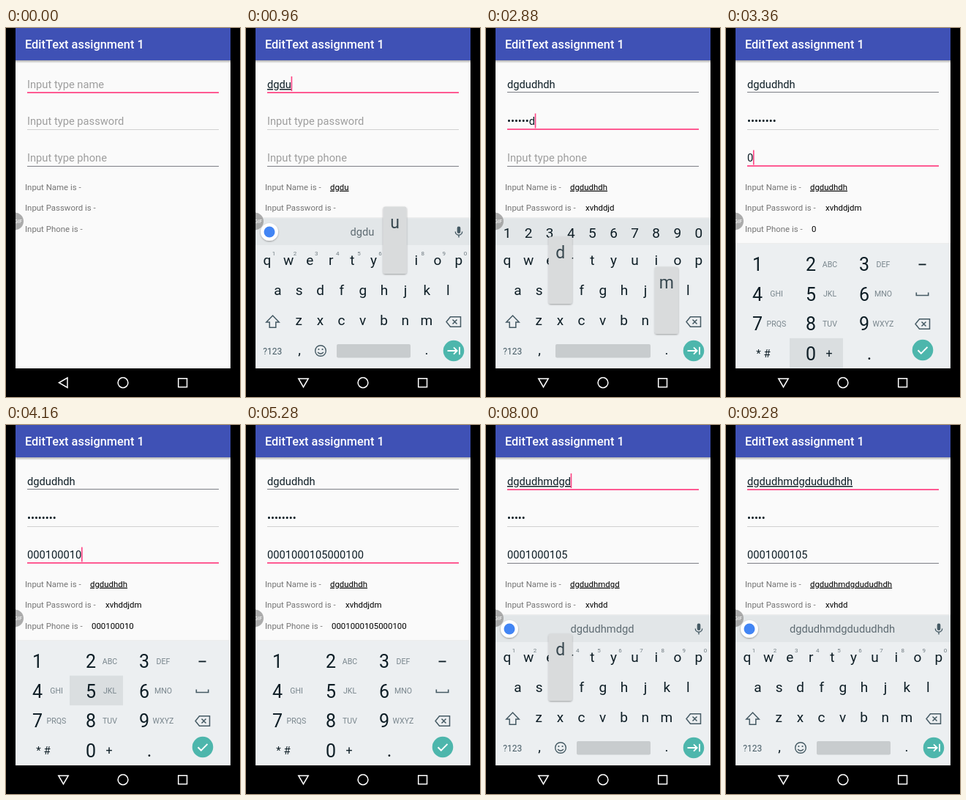
These frames come from a looping animation (320 px wide and 503 px high, 9600 ms). An HTML page:

```html
<!DOCTYPE html>
<html lang="en">
<head>
<meta charset="utf-8">
<title>EditText assignment 1</title>
<style>
  html, body { margin: 0; width: 100%; height: 100%; overflow: hidden; background: #000; }
  svg { display: block; width: 320px; height: 503px; }
  text { font-family: Roboto, sans-serif; white-space: pre; }
  .under { text-decoration: underline; text-decoration-skip-ink: none; }
</style>
</head>
<body>
<svg id="stage" viewBox="0 0 320 503"></svg>
<script>
const LOOP = 9600;
const PASSWORD = 'xvhddjdm';
const PHONE = '0001000105000100';
const INK = '#0e1e26', GREY = '#455a64', PINK = '#ff4081', TEAL = '#4db6ac';
const stage = document.getElementById('stage');

// Each step: time, focused field, its content (text or length), pressed keys, extras
const steps = [
  [0, 'name', '', '', { keyboard: 0, cursor: false }],
  [160, 'name', '', '', { keyboard: .55 }],
  [320, 'name', ''],
  [480, 'name', 'd', 'd'],
  [640, 'name', 'dg', 'g'],
  [800, 'name', 'dgd', 'd'],
  [960, 'name', 'dgdu', 'u'],
  [1120, 'name', 'dgdud', 'd'],
  [1280, 'name', 'dgdudh', 'h'],
  [1440, 'name', 'dgdudhd', 'd'],
  [1600, 'name', 'dgdudhdh', 'h'],
  [1760, 'name', 'dgdudhdh'],
  [2080, 'pass', 0],
  [2240, 'pass', 1, 'x'],
  [2400, 'pass', 2, 'v'],
  [2560, 'pass', 3, 'h'],
  [2720, 'pass', 5, 'd'],
  [2880, 'pass', 7, 'dm'],
  [3040, 'pass', 8, 'm'],
  [3200, 'phone', 0],
  [3360, 'phone', 1, '0'],
  [3520, 'phone', 3, '0'],
  [3680, 'phone', 4, '1'],
  [3840, 'phone', 6, '0'],
  [4000, 'phone', 7, '0'],
  [4160, 'phone', 9, '5'],
  [4320, 'phone', 11, '0'],
  [4480, 'phone', 13, '0'],
  [4640, 'phone', 15, '0'],
  [4800, 'phone', 16],
  [5280, 'phone', 16, '', { cursor: false }],
  [5440, 'phone', 15, '<'],
  [5760, 'phone', 14, '<'],
  [5920, 'phone', 12, '<'],
  [6080, 'phone', 10, '<'],
  [6240, 'pass', 8],
  [6400, 'pass', 7, '<'],
  [6560, 'pass', 6, '<'],
  [6720, 'pass', 5, '<'],
  [6880, 'pass', 5],
  [7200, 'name', 'dgdudhdh'],
  [7360, 'name', 'dgdudhd', '<'],
  [7520, 'name', 'dgdudh', '<'],
  [7680, 'name', 'dgdudhm', 'm'],
  [7840, 'name', 'dgdudhmdg', 'g'],
  [8000, 'name', 'dgdudhmdgd', 'd'],
  [8160, 'name', 'dgdudhmdgdud', 'd'],
  [8320, 'name', 'dgdudhmdgdudu', 'u'],
  [8480, 'name', 'dgdudhmdgdududh', 'h'],
  [8640, 'name', 'dgdudhmdgdududhdh', 'h'],
  [8800, 'name', 'dgdudhmdgdududhdh'],
  [9280, 'name', 'dgdudhmdgdududhdh', '', { cursor: false }]
];

// Carry the content of the other fields from step to step
const held = { name: '', pass: 0, phone: 0 };
const states = steps.map(([time, focus, value, press = '', extra], i) => {
  const typed = focus === 'pass' && press && press !== '<';
  held[focus] = value;
  return { time, focus, press, typed, keyboard: 1, cursor: true, ...held, ...extra };
});

const text = (s, x, y, size, fill = INK, attrs = '') =>
  `<text x="${x}" y="${y}" font-size="${size}" fill="${fill}" ${attrs}>${s}</text>`;
const mid = (s, x, y, size, fill, attrs = '') =>
  text(s, x, y, size, fill, 'text-anchor="middle" ' + attrs);
const rect = (x, y, w, h, fill, attrs = '') =>
  `<rect x="${x}" y="${y}" width="${w}" height="${h}" fill="${fill}" ${attrs}/>`;
const disc = (x, y, r, fill, attrs = '') =>
  `<circle cx="${x}" cy="${y}" r="${r}" fill="${fill}" ${attrs}/>`;
const line = (d, stroke = GREY, width = 1.6) =>
  `<path d="${d}" fill="none" stroke="${stroke}" stroke-width="${width}"/>`;

const defs = `<defs>
  <linearGradient id="drop" x2="0" y2="1">
    <stop stop-color="#000" stop-opacity=".3"/><stop offset="1" stop-color="#000" stop-opacity="0"/>
  </linearGradient>
  <filter id="lift" x="-20%" y="-20%" width="140%" height="140%">
    <feDropShadow dx="0" dy="1" stdDeviation="1" flood-opacity=".35"/>
  </filter>
  <clipPath id="screen"><rect x="13" width="294" height="464"/></clipPath>
</defs>`;

function field(id, hint, value, base, idle, s) {
  const active = s.focus === id;
  const under = active && id === 'name' ? 'class="under"' : '';
  const body = value
    ? text(value, 29, base, 14.7, INK, `id="${id}" ${under}`)
    : text(hint, 29, base, 14.7, '#9e9e9e');
  const rule = active
    ? rect(29, base + 5.2, 262, 1.7, PINK)
    : rect(29, base + (id === 'name' ? 5 : 6), 262, 1, idle);
  return body + rule;
}

function form(s) {
  const shown = PASSWORD.slice(0, s.pass);
  const dots = s.typed ? '•'.repeat(s.pass - 1) + shown.slice(-1) : '•'.repeat(s.pass);
  const digits = PHONE.slice(0, s.phone);
  const label = (name, value, x, y, attrs) =>
    text(`Input ${name} is -`, 26, y, 11.43, '#757575') + text(value, x, y, 11.43, '#000', attrs);
  return rect(13, 0, 294, 464, '#fafafa') +
    rect(13, 44, 294, 4, 'url(#drop)') +
    rect(13, 0, 294, 44, '#3f51b5') +
    text('EditText assignment 1', 26, 28, 16.33, '#fff', 'font-weight="500"') +
    field('name', 'Input type name', s.name, 82, '#7d7f86', s) +
    field('pass', 'Input type password', dots, 132, '#d0d0d0', s) +
    field('phone', 'Input type phone', digits, 182, '#7d7f86', s) +
    label('Name', s.name, 115, 220.7, 'class="under"') +
    label('Password', shown, 136, 249.4) +
    label('Phone', digits, 117, 278);
}

const erase = (x, y) => line(`M${x - 10} ${y}l5.5-6.7h14v13.4h-14z` +
  `M${x - 1.5} ${y - 3}l6 6m0-6l-6 6`, GREY, 1.5);

const rows = [['qwertyuiop', 29, 323], ['asdfghjkl', 43.5, 364], ['zxcvbnm', 72.3, 405]];
const PITCH = 29.1;

function popup(key) {
  const [letters, x0, base] = rows.find(r => r[0].includes(key));
  const x = x0 + PITCH * letters.indexOf(key);
  return rect(x - 16, base - 79.5, 32, 91.5, '#d9dbdc', 'rx="3" filter="url(#lift)"') +
    mid(key, x, base - 50, 23, '#37474f');
}

function strip(s) {
  const at = i => 29 + PITCH * i;
  const numbers = [...'1234567890'];
  if (s.focus === 'pass') return numbers.map((n, i) => mid(n, at(i), 286, 19)).join('');
  return disc(32, 278, 12, '#fff', 'filter="url(#lift)"') + disc(32, 278, 7.5, '#4285f4') +
    mid(s.name, 159, 283, 14.7, '#5f6c73') +
    rect(288.7, 270.5, 4.6, 9.5, GREY, 'rx="2.3"') +
    line('M286.3 277.5a4.7 4.7 0 0 0 9.4 0M291 282v3.5', GREY, 1.4) +
    numbers.map((n, i) => mid(n, at(i) + 9, 310, 8, '#6f7b81')).join('');
}

function letterBoard(s) {
  const secret = s.focus === 'pass';
  const keys = rows.map(([letters, x, y]) =>
    [...letters].map((c, i) => mid(c, x + PITCH * i, y, 19)).join('')).join('');
  const face = disc(102, 440, 7.3, 'none', `stroke="${GREY}" stroke-width="1.4"`) +
    disc(99.4, 438, 1.1, GREY) + disc(104.6, 438, 1.1, GREY) + line('M98 442q4 4 8 0', GREY, 1.3);
  const space = secret ? 95 : 124;
  return rect(13, 258, 294, 2, '#000', 'opacity=".05"') +
    rect(13, 259.5, 294, 205, '#eceff1') + rect(13, 259.5, 294, 36.5, '#e2e6e8') +
    (s.press === '<' ? rect(266, 381, 36, 39, '#dadee0') : '') +
    strip(s) + keys +
    line('M36.5 392l8.7 9h-4.4v7.3h-8.6v-7.3h-4.4z', GREY, 1.5) + erase(284, 400.5) +
    mid('?123', 36.3, 444.5, 12, GREY) + mid(',', 73, 445, 19) + (secret ? '' : face) +
    rect(space, 431, 225 - space, 18.5, '#c8ccce', 'rx="2"') + mid('.', 247, 445, 19) +
    disc(284, 440, 14.3, TEAL) +
    line('M275.5 440h13M284 435.3l4.7 4.7l-4.7 4.7M292 434.7v10.6', '#fff', 1.8) +
    (s.press === '<' ? '' : [...s.press].map(popup).join(''));
}

const subs = ['', 'ABC', 'DEF', 'GHI', 'JKL', 'MNO', 'PRQS', 'TUV', 'WXYZ'];
const PAD_ORDER = '123-456_789<*0.';

function numberPad(s) {
  let out = rect(13, 293, 294, 1, '#000', 'opacity=".05"') + rect(13, 294, 294, 170, '#eceff1');
  if (s.press) {
    const i = PAD_ORDER.indexOf(s.press);
    out += rect(14 + 73 * (i % 4), 301 + 40.6 * Math.floor(i / 4), 73, 40.6, '#dadee0');
  }
  subs.forEach((sub, i) => {
    const x = 43 + 73 * (i % 3), y = 331 + 40.6 * Math.floor(i / 3);
    out += mid(i + 1, x, y, 25) + mid(sub, x + 26, y - 5.5, 10.6, '#78858c');
  });
  return out + mid('* #', 51, 449, 15) + mid('0', 116, 453, 25) + mid('+', 141, 449, 16) +
    mid('.', 196, 452, 25) + rect(263.5, 321.5, 10, 1.8, INK) +
    line('M260.3 360.5v4h16.4v-4') + erase(269, 403.5) +
    disc(269, 439, 14.3, TEAL) + line('M262.5 439.3l4.3 4.3l8.7-8.7', '#fff', 2);
}

function overlay(s) {
  const back = s.keyboard ? 'M71.8 478h13.4l-6.7 11.5z' : 'M72.5 483.5l11.5-6.6v13.2z';
  return `<g clip-path="url(#screen)">${disc(12, 263.5, 12, '#9c9c9c', 'opacity=".85"')}` +
    text('GIF', 22, 266, 7, '#fff', 'text-anchor="end"') + '</g>' +
    rect(0, 464, 320, 39, '#000') + line(back, '#fff', 1.5) +
    disc(160, 483.5, 6.9, 'none', 'stroke="#fff" stroke-width="1.5"') +
    line('M235.7 477.7h11.8v11.8h-11.8z', '#fff', 1.5);
}

function caret(s) {
  const y = { name: 66, pass: 116.5, phone: 166.5 }[s.focus];
  const label = document.getElementById(s.focus);
  const x = 29 + (label ? label.getComputedTextLength() : 0);
  document.getElementById('caret').innerHTML = rect(x - .3, y, 1.6, 20, PINK);
}

function draw(s) {
  const board = s.focus === 'phone' ? numberPad(s) : letterBoard(s);
  const slide = 205 * (1 - s.keyboard);
  stage.innerHTML = defs + form(s) + '<g id="caret"></g>' +
    (s.keyboard ? `<g transform="translate(0 ${slide})">${board}</g>` : '') + overlay(s);
  if (s.cursor) caret(s);
}

const start = performance.now();
let current;
function tick() {
  const t = Math.max(0, performance.now() - start) % LOOP;
  const next = states.findLast(s => s.time <= t);
  if (next !== current) draw(current = next);
  requestAnimationFrame(tick);
}
tick();
</script>
</body>
</html>
```
